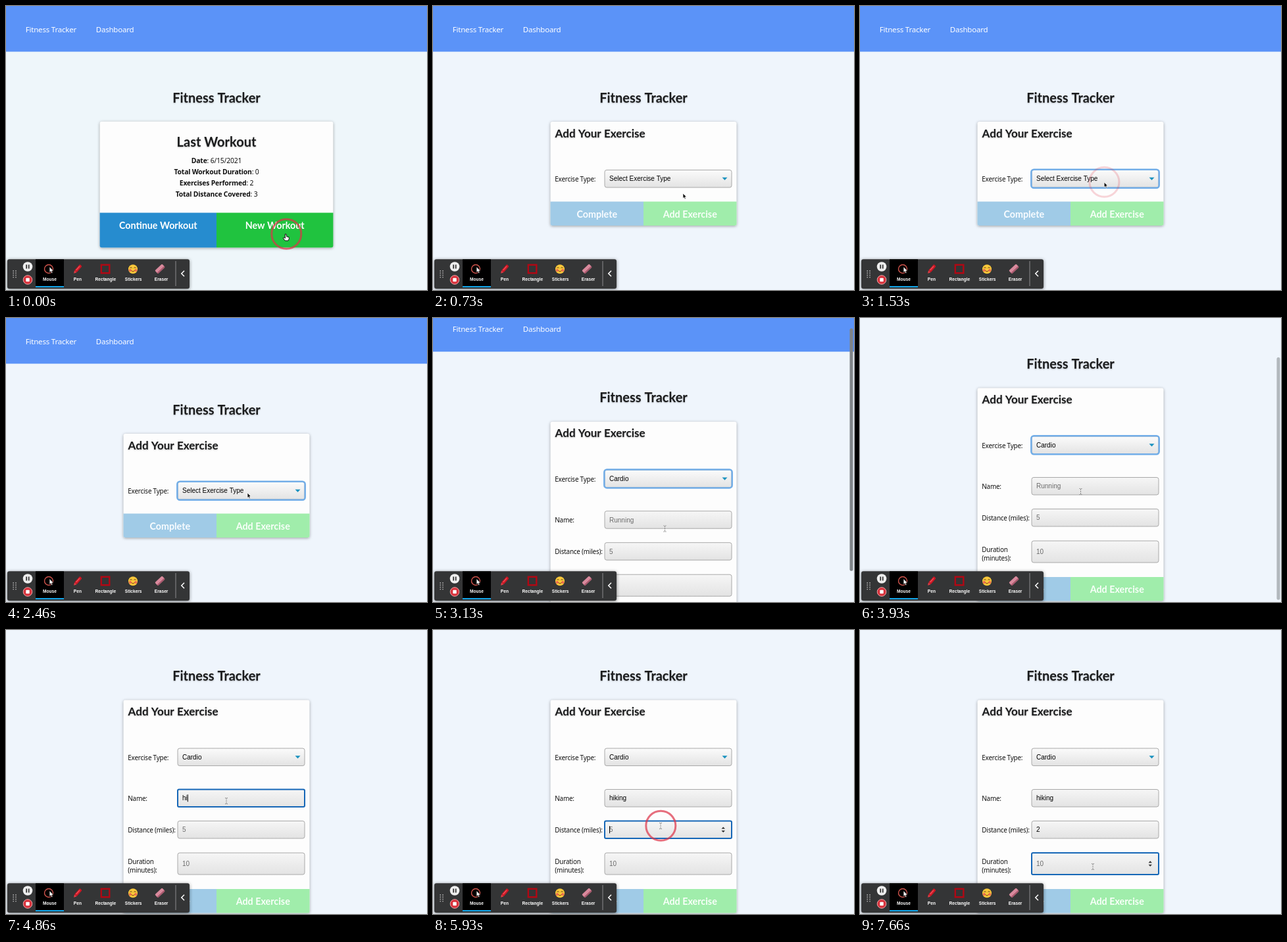
Write an HTML page with a canvas that moves like this. It is 640 px wide and 432 px high and loops after 8 s.

```html
<!DOCTYPE html>
<html lang="en">
<head>
<meta charset="utf-8">
<title>Fitness Tracker</title>
<style>
html, body { margin: 0; width: 100%; height: 100%; overflow: hidden; background: #eff5fb; }
canvas { display: block; }
</style>
</head>
<body>
<canvas id="stage" width="640" height="432"></canvas>
<script>
const ctx = document.getElementById('stage').getContext('2d');
const LOOP = 8000;
const LATO = 'Lato, sans-serif', NOTO = '"Noto Sans", sans-serif', ARIAL = '"Liberation Sans", sans-serif';
const PAGE_SWITCH = 130, EXPAND = 2860, MAX_SCROLL = 69.5;

// [time, value...] keys
const pointerKeys = [
  [460, 426, 347], [730, 380, 285], [1260, 373, 269], [2130, 367, 266], [2530, 367, 266],
  [2860, 358, 302], [3300, 349, 332], [3600, 349, 332], [3930, 335.5, 264], [4060, 335, 260],
  [5660, 335, 260], [5860, 346, 298], [6630, 346, 298], [7060, 354, 360]
];
const scrollKeys = [[3060, 0], [3130, 18], [3260, 58], [3400, 71], [3560, 71], [3620, MAX_SCROLL]];
const clicks = [[-200, 260], [1330, 1560], [4060, 4260], [5830, 6100], [7100, 7260]];
const focusTimes = [[7100, 'duration'], [5830, 'distance'], [4060, 'name'], [1330, 'type']];

const clamp = v => Math.max(0, Math.min(1, v));

function sample(keys, t) {
  const next = keys.findIndex(k => k[0] > t);
  if (next === 0) return keys[0].slice(1);
  if (next < 0) return keys[keys.length - 1].slice(1);
  const a = keys[next - 1], b = keys[next];
  const p = (t - a[0]) / (b[0] - a[0]);
  return a.slice(1).map((v, i) => v + (b[i + 1] - v) * p);
}

function setFont(font) {
  ctx.font = font;
  ctx.letterSpacing = font.includes('Noto') ? '-0.2px' : '0px';
}

function text(str, x, y, font, color = '#111', align = 'left') {
  setFont(font);
  ctx.fillStyle = color;
  ctx.textAlign = align;
  ctx.fillText(str, x, y);
}

function textWidth(str, font) {
  setFont(font);
  return ctx.measureText(str).width;
}

function rect(x, y, w, h, fill, radius = 0, stroke, lineWidth = 1) {
  ctx.beginPath();
  ctx.roundRect(x, y, w, h, radius);
  if (fill) { ctx.fillStyle = fill; ctx.fill(); }
  if (stroke) { ctx.strokeStyle = stroke; ctx.lineWidth = lineWidth; ctx.stroke(); }
}

function circle(x, y, r, fill, stroke, lineWidth = 1) {
  rect(x - r, y - r, 2 * r, 2 * r, fill, r, stroke, lineWidth);
}

function shape(points, fill, stroke, lineWidth = 1, close = true) {
  ctx.beginPath();
  points.forEach(([x, y]) => ctx.lineTo(x, y));
  if (close) ctx.closePath();
  if (fill) { ctx.fillStyle = fill; ctx.fill(); }
  if (stroke) { ctx.strokeStyle = stroke; ctx.lineWidth = lineWidth; ctx.stroke(); }
}

function at(x, y, draw, angle = 0) {
  ctx.save();
  ctx.translate(x, y);
  ctx.rotate(angle);
  draw();
  ctx.restore();
}

function shadowed(color, blur, dy, draw) {
  ctx.save();
  ctx.shadowColor = color;
  ctx.shadowBlur = blur;
  ctx.shadowOffsetY = dy;
  draw();
  ctx.restore();
}

function heading(str, x, y, size, align) {
  shadowed('rgba(0,0,0,.3)', 2, 1, () => text(str, x, y, `bold ${size}px ${LATO}`, '#1b1c1d', align));
}

function card(x, y, w, h, buttonHeight, buttons) {
  shadowed('rgba(0,0,0,.35)', 4, 1, () => rect(x, y, w, h, '#fdfdfd', 3));
  const top = y + h - buttonHeight;
  buttons.forEach(([label, color, ink], i) => {
    rect(x + i * w / 2, top, w / 2, buttonHeight, color, i ? [0, 0, 3, 0] : [0, 0, 0, 3]);
    text(label, x + w / 4 + i * w / 2, top + 24.2, `bold 14.3px ${LATO}`, ink, 'center');
  });
}

function header() {
  rect(0, 0, 640, 69.5, '#5b93f8');
  text('Fitness Tracker', 29.7, 39.5, `500 11.5px ${NOTO}`, '#fff');
  text('Dashboard', 136.7, 39.5, `500 11.5px ${NOTO}`, '#fff');
  heading('Fitness Tracker', 320, 146.5, 20, 'center');
}

function lastWorkout() {
  card(142.6, 175.7, 354.8, 191.8, 53, [['Continue Workout', '#268ccf', '#fff'], ['New Workout', '#20c33f', '#fff']]);
  heading('Last Workout', 320, 214, 20, 'center');
  const bold = `bold 10.4px ${NOTO}`, plain = `10.4px ${NOTO}`;
  const rows = [['Date', '6/15/2021'], ['Total Workout Duration', '0'], ['Exercises Performed', '2'], ['Total Distance Covered', '3']];
  rows.forEach(([label, value], i) => {
    const y = 239.3 + i * 17;
    const labelWidth = textWidth(label, bold);
    const x = 320 - (labelWidth + textWidth(': ' + value, plain)) / 2;
    text(label, x, y, bold);
    text(': ' + value, x + labelWidth, y, plain);
  });
}

function field(y, h, { value = '', placeholder = '', focused, isSelect, isNumber, caret }) {
  const fill = ctx.createLinearGradient(0, y, 0, y + h);
  fill.addColorStop(0, isSelect ? '#fbfbfb' : '#f6f6f6');
  fill.addColorStop(1, '#e3e3e3');
  rect(261, y, 193, h, fill, 3, '#a9a9a9');
  if (focused) {
    if (isSelect) rect(260.3, y - 0.7, 194.4, h + 1.4, null, 4, '#73aee8', 2.5);
    else rect(261, y, 193, h, null, 2, '#1667b7', 2);
  }
  const mid = y + h / 2, font = `10px ${ARIAL}`;
  text(value || placeholder, 268, mid + 3.6, font, value ? '#000' : '#6c6c6c');
  if (isSelect) shape([[439.5, mid - 2], [447.5, mid - 2], [443.5, mid + 2.2]], '#1a92bf');
  if (focused && isNumber) {
    shape([[438.5, mid - 1.3], [444, mid - 1.3], [441.2, mid - 4.3]], '#333');
    shape([[438.5, mid + 1.3], [444, mid + 1.3], [441.2, mid + 4.3]], '#333');
  }
  if (focused && caret) rect(268 + textWidth(value, font), mid - 5.5, 1, 11, '#000');
}

function exerciseForm(t) {
  const expanded = t >= EXPAND;
  const focus = (focusTimes.find(f => t >= f[0]) || [])[1];
  const label = (str, y) => text(str, 185.3, y, `9.9px ${NOTO}`);
  card(178.5, 176, 283, expanded ? 324 : 158, 36.5,
    [['Complete', '#a0cbe7', '#f8fcff'], ['Add Exercise', '#a0edab', '#f8fff9']]);
  heading('Add Your Exercise', 185.5, 199.5, 17.1);
  label('Exercise Type:', 267);
  field(249.5, 26.5, { value: expanded ? 'Cardio' : 'Select Exercise Type', isSelect: true, focused: focus === 'type' });
  if (!expanded) return;

  label('Name:', 329);
  label('Distance (miles):', 377.5);
  label('Duration', 425.8);
  label('(minutes):', 438.8);
  const caret = t < 7660;
  const typed = 'hiking'.slice(0, Math.max(0, Math.floor((t - 4660) / 200) + 1));
  field(312, 26.5, { value: typed, placeholder: 'Running', focused: focus === 'name', caret });
  field(360, 26.5, { value: t >= 6530 ? '2' : '', placeholder: '5', focused: focus === 'distance', isNumber: true, caret });
  field(408.5, 33, { placeholder: '10', focused: focus === 'duration', isNumber: true, caret });
}

function scrollbar(t, scroll) {
  if (t < 3060 || t > 4200) return;
  ctx.globalAlpha = 1 - clamp((t - 3700) / 500);
  rect(633.5, scroll * 0.86, 5, 369, '#7f8488', 2.5);
  ctx.globalAlpha = 1;
}

function arrow(x, y, scale, fill, stroke) {
  at(x, y, () => {
    ctx.scale(scale, scale);
    shape([[0, 0], [0, 9], [2, 7.2], [3.4, 10.3], [5, 9.6], [3.7, 6.6], [6.4, 6.4]], fill, stroke, 0.8);
  });
}

function hand(x, y) {
  at(x, y, () => shape([[-1.8, 0], [0, 0], [0.6, 3.8], [4, 4.4], [4.4, 7], [3, 10], [-1.8, 10], [-4.8, 6], [-3.8, 5], [-1.6, 6.2]],
    '#fff', '#111', 1));
}

function iBeam(x, y) {
  at(x, y, () => {
    for (const dy of [-3, 0, 3]) rect(-0.5, dy - 0.8, 1, 1.6, '#666');
    for (const dy of [-5, 4]) {
      rect(-2, dy, 1.5, 1, '#888');
      rect(0.5, dy, 1.5, 1, '#888');
    }
  });
}

function pointer(t) {
  const [x, y] = sample(pointerKeys, t);
  const click = clicks.find(([from, to]) => t >= from && t < to);
  if (click) {
    ctx.globalAlpha = 0.7 * clamp((click[1] - t) / 100);
    circle(x + 0.3, y - 0.2, 22.5, null, '#dd3348', 3);
    ctx.globalAlpha = 1;
  }
  if (t < PAGE_SWITCH) hand(x, y);
  else if (t < 3060) arrow(x, y, 0.85, '#111', '#fff');
  else iBeam(x, y);
}

function toolbar() {
  shadowed('rgba(0,0,0,.5)', 5, 1, () => rect(2, 385.2, 277, 44.8, '#343536', 3));
  for (let i = 0; i < 8; i++) circle(11.2 + (i % 2) * 3.8, 403 + (i >> 1) * 3.2, 0.9, '#aaa');

  circle(33, 396.5, 7.3, '#eee');
  rect(30.3, 393.5, 1.8, 6, '#333');
  rect(33.8, 393.5, 1.8, 6, '#333');
  circle(33, 416.5, 6.8, '#d8323c', '#eba5a8', 1);
  rect(30.3, 413.8, 5.4, 5.4, '#fff', 0.8);

  rect(45, 385.2, 43, 42.8, '#000');
  rect(45, 426, 43, 2, '#12a5e8');
  circle(65, 400, 6.5, null, '#d0544c', 1.4);
  arrow(66, 396.5, 1, '#fff', '#000');

  at(109, 400, () => {
    rect(-5, -2.3, 12.5, 4.6, '#cf1624', 1.5);
    shape([[-5, -2.3], [-9, 0], [-5, 2.3]], '#e43a43');
    rect(-3, -1, 8, 1, '#f0646a');
  }, -0.85);

  rect(144.8, 393.8, 12.5, 12.5, null, 0, '#b00814', 2.4);

  circle(193, 400.3, 7, '#f9c83a');
  circle(188.8, 402, 2, '#ee6a50');
  circle(197.2, 402, 2, '#ee6a50');
  shape([[188.5, 398.8], [190, 397.3], [191.5, 398.8]], null, '#51301a', 1, false);
  shape([[194.5, 398.8], [196, 397.3], [197.5, 398.8]], null, '#51301a', 1, false);
  shape([[190.5, 402.5], [193, 404.2], [195.5, 402.5]], null, '#803018', 1, false);

  at(234, 399.8, () => {
    rect(-7.5, -3.4, 15, 6.8, '#d98a9d', 1.5);
    rect(-7.5, 1.3, 15, 2.1, '#a9586d', 1);
  }, -0.75);

  ['Mouse', 'Pen', 'Rectangle', 'Stickers', 'Eraser'].forEach((name, i) =>
    text(name, 66.5 + i * 42.4, 418.2, `bold 6.6px ${ARIAL}`, '#fff', 'center'));
  rect(257.5, 388, 1, 38, '#8b8c8d');
  shape([[271, 402.8], [266.8, 407], [271, 411.2]], null, '#fff', 1.5, false);
}

function draw(t) {
  const [scroll] = sample(scrollKeys, t);
  const overscroll = Math.max(0, scroll - MAX_SCROLL);
  rect(0, 0, 640, 432, t < PAGE_SWITCH ? '#eef6fa' : '#eff5fc');
  at(0, -scroll, () => {
    header();
    if (t < PAGE_SWITCH) lastWorkout();
    else exerciseForm(t);
  });
  if (overscroll) rect(0, 432 - overscroll, 640, overscroll, '#fff');
  scrollbar(t, scroll);
  pointer(t);
  // the fixed toolbar is dragged along by the overscroll bounce
  at(0, -overscroll, toolbar);
}

const start = performance.now();
function tick() {
  draw((performance.now() - start) % LOOP);
  requestAnimationFrame(tick);
}
tick();
</script>
</body>
</html>
```
